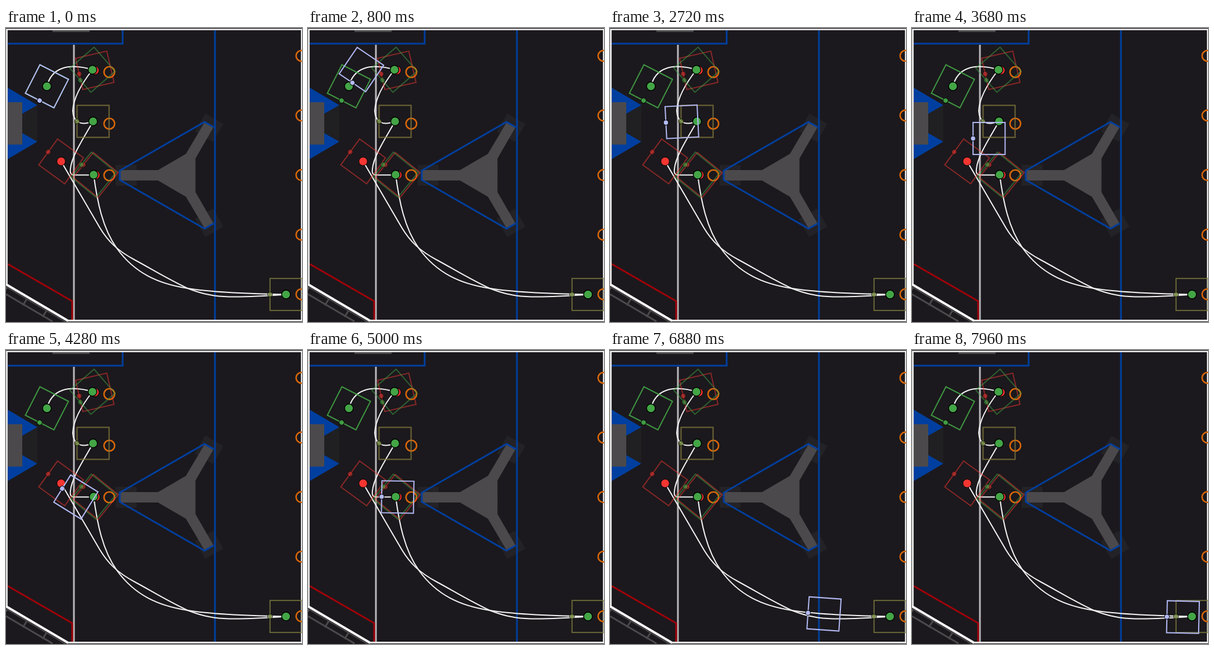
Animation of 510x507 px, one loop 8000 ms. Source, as an HTML page with a canvas:

```html
<!DOCTYPE html>
<html lang="en">
<head>
<meta charset="utf-8">
<title>Robot path preview</title>
<style>
  html, body { margin: 0; width: 100%; height: 100%; overflow: hidden; background: #1b191d; }
  canvas { display: block; }
  svg { position: absolute; }
</style>
</head>
<body>
<canvas id="stage" width="510" height="507"></canvas>
<svg id="routes" width="0" height="0"></svg>
<script>
const ctx = document.getElementById('stage').getContext('2d');
const LOOP = 8000, STEP = 40, HALF = 27.6, RAMP = 0.3;
const BACK = '#1b191d', BLUE = '#003f9f', GRAY = '#4b494b', WHITE = '#f4f4f4';
const RED = '#f43632', GREEN = '#43a546', ROBOT = '#b3b9f4';

// Each leg: route, planned headings at its ends, headings driven at even steps, time span
const legs = [
  { d: 'M70.5 100.5C78 70 105 58 153 73', plan: [117, 167], turn: [117, 120, 150, 179], span: [240, 1600] },
  { d: 'M149 72C131 95 116 120 115 143C116 160 126 170 150 161', plan: [139, 180],
    turn: [179, 139, 139, 181, 180], span: [1680, 3160] },
  { d: 'M150 161C136 186 113 220 111 243C110 251 112 253.5 118 253.5L154.5 253.5', plan: [180, 219],
    turn: [180, 180, 212, 181], span: [3160, 4800] },
  { d: 'M151 253C157 298 166 345 191 380C222 423 262 441 313 449C350 455 400 458 482.5 459.5', plan: [219, 180],
    turn: [181, 188, 184, 180], span: [5320, 7640] },
  { d: 'M482.5 459.5C380 467 355 465 313 449C275 431 250 415 222 400C192 384 176 368 162 345L95 230', plan: [180, 216],
    turn: [180, 216], span: [7640, 10400] }
];

const routes = document.getElementById('routes');
routes.innerHTML = legs.map(leg => `<path d="${leg.d}"/>`).join('');
legs.forEach((leg, i) => {
  const path = routes.children[i], length = path.getTotalLength();
  leg.shape = new Path2D(leg.d);
  leg.at = part => {
    const { x, y } = path.getPointAtLength(part * length);
    return [x, y];
  };
});

function trace(points) {
  ctx.beginPath();
  points.forEach(([x, y]) => ctx.lineTo(x, y));
}

function line(points, color, width) {
  trace(points);
  ctx.strokeStyle = color;
  ctx.lineWidth = width;
  ctx.stroke();
}

function area(points, color) {
  trace(points);
  ctx.fillStyle = color;
  ctx.fill();
}

function box(x, y, width, height, color) {
  ctx.fillStyle = color;
  ctx.fillRect(x, y, width, height);
}

function circle(x, y, radius, stroke, width, fill) {
  ctx.beginPath();
  ctx.arc(x, y, radius, 0, 2 * Math.PI);
  if (fill) {
    ctx.fillStyle = fill;
    ctx.fill();
  }
  ctx.strokeStyle = stroke;
  ctx.lineWidth = width;
  ctx.stroke();
}

function rotated(x, y, degrees, draw) {
  ctx.save();
  ctx.translate(x, y);
  ctx.rotate(degrees * Math.PI / 180);
  draw();
  ctx.restore();
}

// Draws once as given and once flipped about a horizontal axis
function mirrored(axis, draw) {
  draw();
  ctx.save();
  ctx.translate(0, 2 * axis);
  ctx.scale(1, -1);
  draw();
  ctx.restore();
}

function chassis(x, y, heading, color, alpha = 1) {
  rotated(x, y, heading, () => {
    ctx.globalAlpha = alpha;
    ctx.strokeStyle = color;
    ctx.lineWidth = 2;
    ctx.strokeRect(-HALF, -HALF, 2 * HALF, 2 * HALF);
    circle(HALF, 0, 4.3, '#000', 1, color);
  });
}

function drawSpeaker() {
  box(27, 134, 27, 61, '#201f21');
  mirrored(164.5, () => area([[3, 103], [54, 133], [3, 162]], BLUE));
  box(28, 148, 26, 33, '#201f21');
  box(3, 128, 25, 73, GRAY);
}

function drawTruss() {
  const pad = () => box(-18, -18, 36, 36, '#232226');
  rotated(207, 254, 0, pad);
  mirrored(254, () => rotated(350, 172, 30, pad));
  line([[360, 4], [360, 503]], BLUE, 3);
  mirrored(254, () => {
    area([[197, 254.5], [197, 245], [262, 245], [310, 217], [342, 163], [357, 172], [326.5, 225], [326.5, 254.5]], GRAY);
    line([[358, 171], [342, 162], [196, 246], [196, 254.5]], BLUE, 3);
  });
}

function drawWalls() {
  box(80, 3, 64, 4, GRAY);
  line([[117, 29], [117, 504]], '#b9b7b9', 3);
  line([[3, 27], [201, 27], [201, 3]], BLUE, 3);
  line([[3, 407], [114, 471], [114, 503]], '#a10009', 3);
  line([[0, 459], [80, 506]], GRAY, 3);
  line([[0, 446], [103, 507]], GRAY, 2);
  for (let x = 2; x < 80; x += 34) line([[x, 446 + x * 0.59], [x - 7, 457 + x * 0.59]], GRAY, 3);
  line([[0, 442], [107, 505]], '#fff', 4);
  line([[105, 504.5], [510, 504.5]], WHITE, 3);
  line([[1.5, 443], [1.5, 2.5], [509.5, 2.5], [509.5, 505]], WHITE, 2.6);
}

function drawNotes() {
  const ring = (x, y) => circle(x, y, 9.2, '#d9670a', 2.6);
  for (let i = 0; i < 3; i++) ring(178, 76 + 89 * i);
  for (let i = 0; i < 5; i++) ring(509, 48 + 102.8 * i);
}

function drawPlan() {
  ctx.strokeStyle = '#f2f2f2';
  ctx.lineWidth = 2;
  legs.forEach(leg => ctx.stroke(leg.shape));
  legs.forEach(leg => chassis(...leg.at(1), leg.plan[1], RED, 0.5));
  legs.forEach((leg, i) => chassis(...leg.at(0), leg.plan[0], GREEN, i ? 0.5 : 0.9));
  legs.forEach(leg => circle(...leg.at(1), 7.3, '#000', 1, RED));
  legs.forEach(leg => circle(...leg.at(0), 7.5, '#000', 1.4, GREEN));
}

// Constant acceleration, cruise, constant braking
function travel(u) {
  if (u > 0.5) return 1 - travel(1 - u);
  return u < RAMP ? u * u / (2 * RAMP * (1 - RAMP)) : (u - RAMP / 2) / (1 - RAMP);
}

function headingAt(turn, u) {
  const scaled = u * (turn.length - 1);
  const i = Math.min(Math.floor(scaled), turn.length - 2), v = scaled - i;
  return turn[i] + (turn[i + 1] - turn[i]) * v * v * (3 - 2 * v);
}

function drawRobot(time) {
  const leg = legs.findLast(({ span }) => span[0] <= time) || legs[0];
  const [begin, end] = leg.span;
  const u = Math.min(1, Math.max(0, (time - begin) / (end - begin)));
  chassis(...leg.at(travel(u)), headingAt(leg.turn, u), ROBOT);
}

function render() {
  box(0, 0, 510, 507, BACK);
  drawSpeaker();
  drawTruss();
  drawWalls();
  drawNotes();
  drawPlan();
  drawRobot(Math.floor(performance.now() % LOOP / STEP) * STEP);
  requestAnimationFrame(render);
}
render();
</script>
</body>
</html>
```
